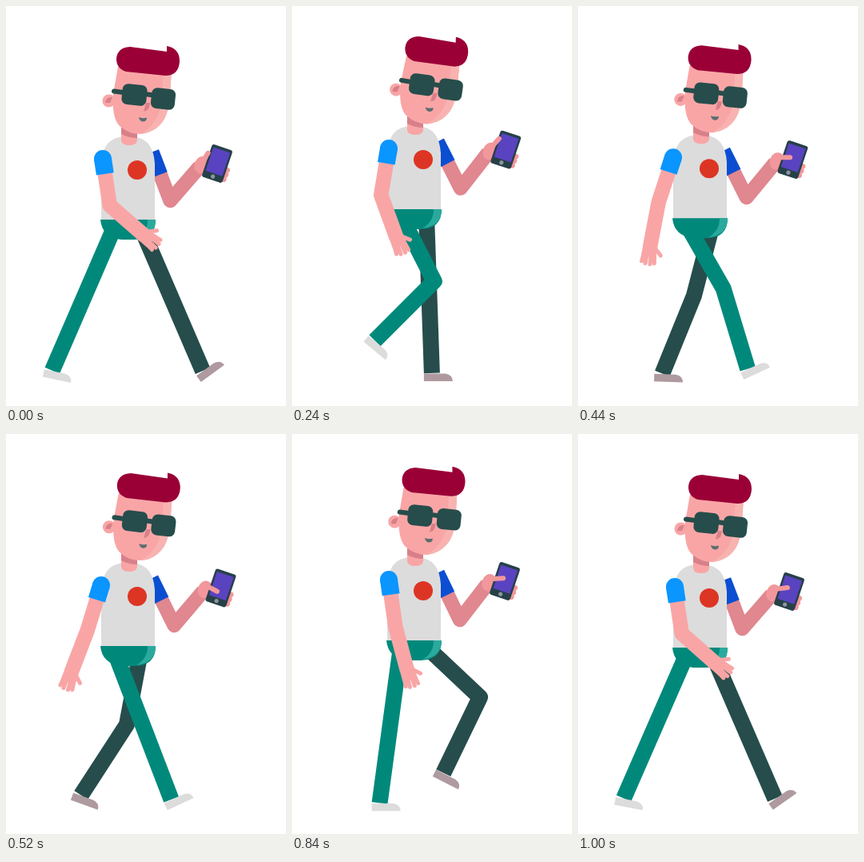
Write an HTML page that moves like this. It is 350x500 px and loops after 1040 ms.

```html
<!DOCTYPE html>
<html lang="en">
<head>
<meta charset="utf-8">
<title>Walking with a phone</title>
<style>
  html, body { margin: 0; width: 100%; height: 100%; overflow: hidden; background: #fff; }
  svg { display: block; width: 350px; height: 500px; }
  .limb { fill: none; stroke-linejoin: round; }
  .finger { fill: none; stroke-linecap: round; }
</style>
</head>
<body>
<svg viewBox="0 0 350 500">
  <defs>
    <path id="shoe" d="M-10 .5H17Q26 2 26 10H-10Z"/>
  </defs>

  <!-- far leg -->
  <path id="farLeg" class="limb" stroke="#264d4b" stroke-width="20"/>
  <use id="farShoe" href="#shoe" fill="#ae9a9f"/>

  <!-- far arm and phone -->
  <path id="farArm" class="limb" stroke="#e0878f" stroke-width="18"/>
  <path id="farSleeve" class="limb" stroke="#0b4ed2" stroke-width="19"/>
  <g id="phone">
    <g fill="#f2979c">
      <ellipse cx="-18" cy="8" rx="9" ry="11"/>
      <circle cx="14.5" cy="4" r="3.5"/>
      <circle cx="14.5" cy="10" r="3.5"/>
      <circle cx="14" cy="16" r="3.5"/>
    </g>
    <rect x="-13.5" y="-21.5" width="27" height="43" rx="3" fill="#264048"/>
    <rect x="-11" y="-18" width="22" height="31" fill="#5a43c0"/>
    <circle cy="17" r="2.6" fill="#8b9699"/>
    <path id="thumb" class="finger" stroke="#f2979c" stroke-width="6"/>
  </g>

  <!-- torso and hips -->
  <g id="torso">
    <path d="M119 268V197Q121 163 150 163H158Q184 165 186 197V268Z" fill="#dcdcdc"/>
    <path d="M144 148H164V168Q163 174 154 174Q145 174 144 168Z" fill="#f9a5a6"/>
    <path d="M144 145H164V165Q153 165 144 160Z" fill="#d8808a"/>
    <circle cx="164" cy="205" r="12" fill="#dd3524"/>
    <path d="M118 267H187Q187 292 160 292H144Q120 289 118 267Z" fill="#00897b"/>
    <path d="M177 267H187Q187 288 163 291Q177 283 177 267Z" fill="#2ba99d"/>
  </g>

  <!-- near leg -->
  <path id="nearLeg" class="limb" stroke="#00897b" stroke-width="20"/>
  <use id="nearShoe" href="#shoe" fill="#dcdcdc"/>

  <!-- head -->
  <g id="head">
    <circle cx="128.5" cy="118.5" r="8" fill="#f9a5a6"/>
    <path d="M124 121Q125 113 133 114L130 121Z" fill="#d8808a"/>
    <path id="face" d="M140 76L134 110Q132 140 142 150Q153 160 168 160Q188 158 198 141Q204 130 205 110L207 80Z" fill="#f9a5a6"/>
    <path d="M197 80H207L205 110Q204 130 198 141Q188 158 168 160Q194 146 195 112Z" fill="#f8b3b1"/>
    <path d="M175 121H180Q179 132 172 131.500Z" fill="#d8808a"/>
    <path d="M166 139Q170 141 176 139.500Q176 144.500 171 144.500Q167 144 166 139Z" fill="#5a6f70"/>
    <g fill="#264d4b">
      <rect x="-15" y="-13" width="31" height="26" rx="7" transform="translate(160 111) rotate(6)"/>
      <rect x="-15" y="-13" width="30" height="26" rx="7" transform="translate(196.500 116) rotate(6)"/>
      <path d="M135 106.500L150 108.500M174 110L184 111.500" stroke="#264d4b" stroke-width="6" stroke-linecap="round"/>
    </g>
    <path d="M155 51L201 57V50Q217 53 217 69Q216 87 199 87L150 82Q138 78 138 66Q139 52 155 51Z" fill="#9a0036"/>
  </g>

  <!-- near arm -->
  <path id="nearArm" class="limb" stroke="#f9a5a6" stroke-width="18.500"/>
  <g id="nearHand">
    <path d="M-9 -2H9L10 12H-9Z" fill="#f9a5a6"/>
    <path class="finger" d="M-6 8L-7 19M-2 8L-2 21M3 8L4 21M7 8L9 19M5 -1L15 8" stroke="#f9a5a6" stroke-width="5"/>
  </g>
  <path id="nearSleeve" class="limb" stroke="#0a95ff" stroke-width="22"/>
  <circle id="nearShoulder" r="11" fill="#0a95ff"/>
</svg>

<script>
const LOOP = 1040, STEP = 40;
const $ = id => document.getElementById(id);
const set = (id, name, value) => $(id).setAttribute(name, value);

// Limb angles are degrees from straight down, positive forward.
const nearLegKeys = [ // time, thigh, shin, shoe tilt
  [0, -23.4, -23.4, 12], [120, 2.5, -42, 40], [240, 27, -45, 40], [320, 44, -29, 24],
  [360, 42, -12.5, 8], [480, 24, 23, -32], [520, 21, 21, -25], [600, 15, 15, 0],
  [680, 7.6, 7.6, 0], [840, -7.7, -7.7, 0], [920, -15.5, -15.5, 0], [1000, -23.6, -23.6, 11]
];
const farLegKeys = [
  [0, 23.3, 23.3, -36], [60, 18.5, 18.5, -8], [120, 13.4, 13.4, 0], [240, 2, 2, 0],
  [360, -5, -17.4, 0], [480, -17, -25, 4], [520, -10.7, -33, 20], [680, 14, -46, 62],
  [760, 33, -46, 50], [840, 46.7, -25.8, 27], [920, 38, 4, -5], [1000, 23.4, 23.4, -35]
];
const bodyKeys = [ // time, belt height, head tilt
  [0, 267, 0], [120, 261, 3], [240, 254, 2], [360, 260, -0.5], [480, 266.5, 0],
  [520, 265, 0.5], [680, 257, 3], [760, 254.5, 2], [840, 258, -0.3], [1000, 267, 0]
];
const armKeys = [ // time, upper arm, forearm
  [0, 8.5, 49], [120, 3, 34], [360, -18.5, 5], [520, -17, -21],
  [680, -4, -9], [840, 8, 15], [1000, 8.5, 48.5]
];
const phoneKeys = [ // time, x, height over belt, thumb x, thumb y
  [0, 264, 70, -15, -9], [120, 266, 74.5, -17, -11], [360, 268, 74, -6, -9],
  [520, 268.5, 72.5, -3, 5.5], [680, 267.5, 77, -3, 6], [840, 266, 74, -3, -3],
  [1000, 264, 70, -3.5, -4]
];

// Periodic cubic interpolation without overshoot.
function sample(keys, t) {
  const n = keys.length;
  const i = keys.findLastIndex(k => k[0] <= t);
  const row = j => keys[(j + n) % n];
  const time = j => row(j)[0] + LOOP * Math.floor(j / n);
  const slope = (j, c) => (row(j + 1)[c] - row(j)[c]) / (time(j + 1) - time(j));
  const tangent = (j, c) => {
    const a = slope(j - 1, c), b = slope(j, c);
    return a * b <= 0 ? 0 : 2 * a * b / (a + b);
  };
  const h = time(i + 1) - time(i), u = (t - time(i)) / h, v = 1 - u;
  return row(i).slice(1).map((a, k) => {
    const c = k + 1;
    return a * v * v * (1 + 2 * u) + row(i + 1)[c] * u * u * (3 - 2 * u)
      + h * u * v * (tangent(i, c) * v - tangent(i + 1, c) * u);
  });
}

const rad = deg => deg * Math.PI / 180;
const reach = ([x, y], deg, len) => [x + len * Math.sin(rad(deg)), y + len * Math.cos(rad(deg))];
const line = (...points) => "M" + points.map(p => p.map(n => n.toFixed(2)).join(" ")).join("L");
const place = ([x, y], deg) => `translate(${x} ${y}) rotate(${deg})`;

function drawLeg(side, hip, [thigh, shin, tilt]) {
  const knee = reach(hip, thigh, 92);
  const ankle = reach(knee, shin, 105);
  set(side + "Leg", "d", line(hip, knee, ankle));
  set(side + "Shoe", "transform", place(ankle, tilt));
}

function drawNearArm(shoulder, [upper, fore]) {
  const elbow = reach(shoulder, upper, 59);
  const wrist = reach(elbow, fore, 57);
  set("nearArm", "d", line(shoulder, elbow, wrist));
  set("nearHand", "transform", place(wrist, -fore));
  set("nearSleeve", "d", line(shoulder, reach(shoulder, upper, 19)));
  set("nearShoulder", "transform", place(shoulder, 0));
}

function drawFarArm(belt, [x, lift, thumbX, thumbY]) {
  const shoulder = [185, belt - 77];
  const phone = [x, belt - lift];
  const wrist = [phone[0] - 22, phone[1] + 4];
  const dx = wrist[0] - shoulder[0], dy = wrist[1] - shoulder[1];
  const dist = Math.hypot(dx, dy), a = 57, b = 56;
  const bend = Math.acos((a * a + dist * dist - b * b) / (2 * a * dist));
  const upper = (Math.atan2(dx, dy) - bend) * 180 / Math.PI;
  const elbow = reach(shoulder, upper, a);
  set("farArm", "d", line(shoulder, elbow, wrist));
  set("farSleeve", "d", line(reach(shoulder, upper, -8), reach(shoulder, upper, 22)));
  set("phone", "transform", place(phone, 18.5));
  set("thumb", "d", line([-18, 3], [thumbX, thumbY]));
}

function draw(now) {
  const t = Math.floor((now % LOOP) / STEP) * STEP;
  const [belt, tilt] = sample(bodyKeys, t);
  const shift = `translate(0 ${belt - 267})`;
  set("torso", "transform", shift);
  set("head", "transform", `${shift} rotate(${tilt} 154 162)`);
  drawLeg("near", [136, belt + 8], sample(nearLegKeys, t));
  drawLeg("far", [168, belt + 8], sample(farLegKeys, t));
  drawNearArm([121 - (t > 240 && t < 640 ? 2 : 0), belt - 76], sample(armKeys, t));
  drawFarArm(belt, sample(phoneKeys, t));
  requestAnimationFrame(draw);
}
draw(performance.now());
</script>
</body>
</html>
```
